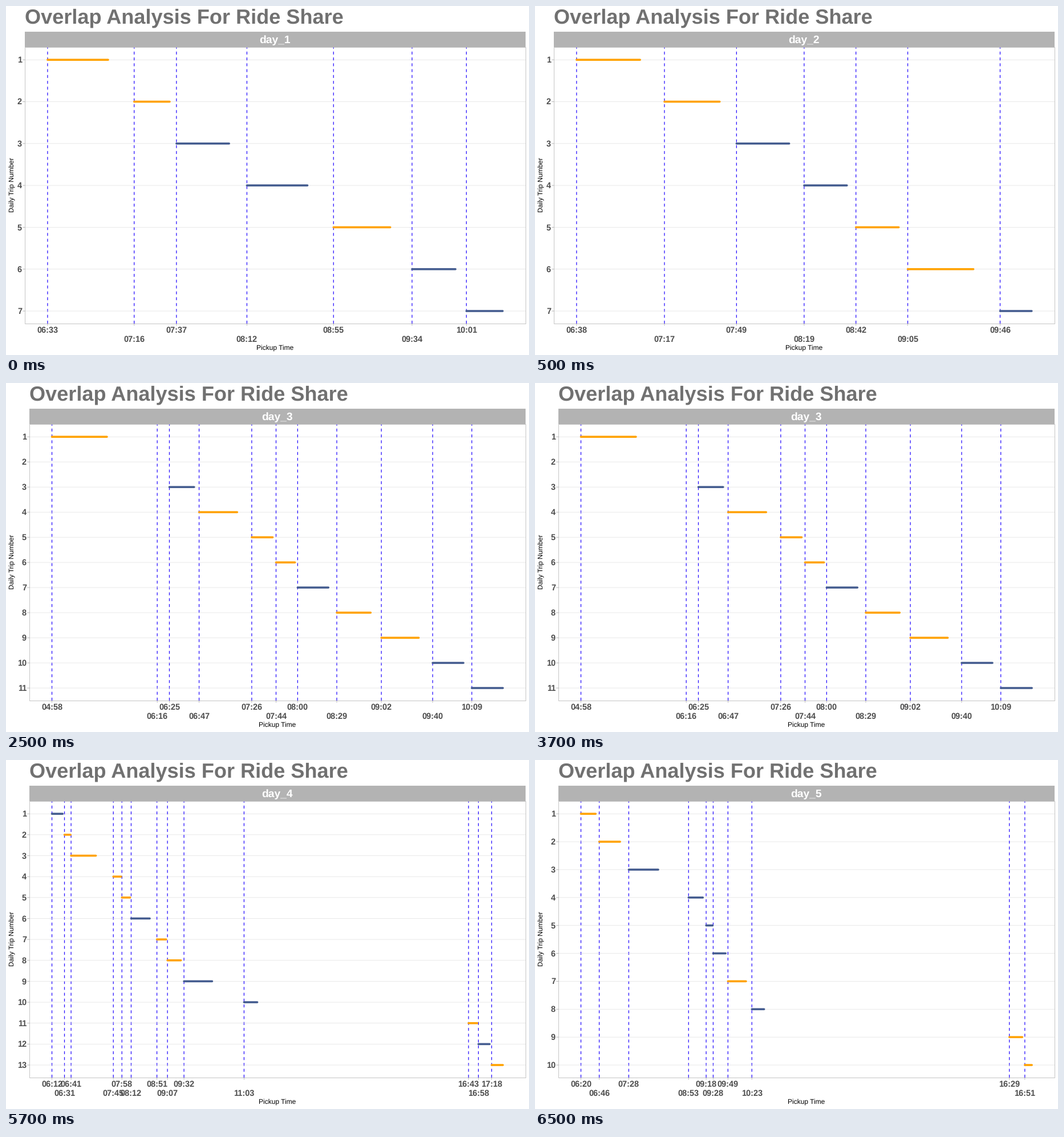
Recreate the animation shown at these times as a matplotlib script. Size 917 px wide and 611 px high, loop 8 s.

```python
import math

import matplotlib.pyplot as plt
from matplotlib.animation import FuncAnimation
from matplotlib.patches import Rectangle

WIDTH, HEIGHT, DPI = 917, 611, 64
STRIP_TOP, TOP, BOTTOM, RIGHT = 45, 72.2, 556, 910.7
EXPAND = 0.05 / 1.1  # share of the panel left free on each side
GREY, GRID, TICK_TEXT = "#b3b3b3", "#dedede", "#4d4d4d"
BAR_COLORS = {"o": "#ffa200", "b": "#445c8f"}
DASH_COLOR = "#2810ff"

# Pickup labels, the end of the last trip, and the bar colors (o = orange, b = blue).
DAYS = [
    ("06:33 07:16 07:37 08:12 08:55 09:34 10:01", "10:19", "oobbobb"),
    ("06:38 07:17 07:49 08:19 08:42 09:05 09:46", "10:00", "oobboob"),
    ("04:58 06:16 06:25 06:47 07:26 07:44 08:00 08:29 09:02 09:40 10:09",
     "10:32", "ooboooboobb"),
    ("06:12 06:31 06:41 07:45 07:58 08:12 08:51 09:07 09:32 11:03 16:43 16:58 17:18",
     "17:35", "booooboobbobo"),
    ("06:20 06:46 07:28 08:53 09:18 09:28 09:49 10:23 16:29 16:51",
     "17:01", "oobbbboboo"),
]

plt.rcParams.update({
    "font.family": "Liberation Sans",
    "text.hinting": "none",
    "toolbar": "None",
})

fig = plt.figure(figsize=(WIDTH / DPI, HEIGHT / DPI), dpi=DPI, facecolor="white")
ax = fig.add_axes([0, 0, 1, 1])


def points(px):
    return px * 72 / DPI


def line(xs, ys, color, width, **style):
    ax.plot(xs, ys, color=color, lw=points(width), snap=False, **style)


def label(x, y, text, size, color="black", **style):
    ax.text(x, y, text, fontsize=points(size), color=color, va="baseline", **style)


def to_minutes(clock):
    hours, minutes = map(int, clock.split(":"))
    return 60 * hours + minutes


def trip_minutes(gap):
    """A trip fills most of a short gap and less of a long one; tiny gaps hold none."""
    return gap * math.exp(-gap / 120) if gap >= 10 else 0


def draw_day(index):
    pickups, closing, colors = DAYS[index]
    clocks = pickups.split()
    starts = [to_minutes(clock) for clock in clocks]
    end = to_minutes(closing)
    count = len(clocks)
    left = 33 if count < 10 else 41
    middle = (left + RIGHT) / 2

    def time_x(minute):
        share = (minute - starts[0]) / (end - starts[0])
        return left + (RIGHT - left) * (EXPAND + (1 - 2 * EXPAND) * share)

    def row_y(row):
        share = row / (count - 1)
        return TOP + (BOTTOM - TOP) * (EXPAND + (1 - 2 * EXPAND) * share)

    for row, (clock, start) in enumerate(zip(clocks, starts)):
        x, y = time_x(start), row_y(row)
        line([left, RIGHT], [y, y], GRID, 0.65)
        line([left - 3.3, left], [y, y], GREY, 0.9)
        line([x, x], [BOTTOM, BOTTOM + 3.3], GREY, 0.9)
        line([x, x], [BOTTOM, TOP], DASH_COLOR, 1.28,
             linestyle=(0, (4, 4)), dash_capstyle="butt")
        label(left - 5, y + 5, str(row + 1), 14.5, TICK_TEXT, weight="bold", ha="right")
        label(x, 588 if row % 2 else 572, clock, 14.5, TICK_TEXT,
              weight="bold", ha="center")

    for row, start in enumerate(starts):
        is_last = row == count - 1
        duration = end - start if is_last else trip_minutes(starts[row + 1] - start)
        if duration:
            y = row_y(row)
            line([time_x(start), time_x(start + duration)], [y, y],
                 BAR_COLORS[colors[row]], 3.6, solid_capstyle="round", zorder=2.4)

    ax.add_patch(Rectangle((left, TOP), RIGHT - left, BOTTOM - TOP,
                           fill=False, ec=GREY, lw=points(0.75), zorder=2.5))
    ax.add_patch(Rectangle((left, STRIP_TOP), RIGHT - left, TOP - STRIP_TOP,
                           fc=GREY, lw=0, zorder=2.6))

    label(left, 31, "Overlap Analysis For Ride Share", 36.15, "#717171", weight="bold")
    label(middle, 65.3, f"day_{index + 1}", 19.3, "white", weight="bold", ha="center")
    label(middle, 602.7, "Pickup Time", 12, ha="center")
    label(14.6, 313.5, "Daily Trip Number", 12, ha="center",
          rotation=90, rotation_mode="anchor")


def update(frame):
    ax.clear()
    ax.set(xlim=(0, WIDTH), ylim=(HEIGHT, 0))
    ax.axis("off")
    # Half-second steps: the first day shows for one, each later day for up to four.
    draw_day((frame + 3) // 4)
    return []


animation = FuncAnimation(fig, update, frames=16, interval=500,
                          init_func=lambda: update(0), repeat=True, repeat_delay=0)
plt.show()
```
